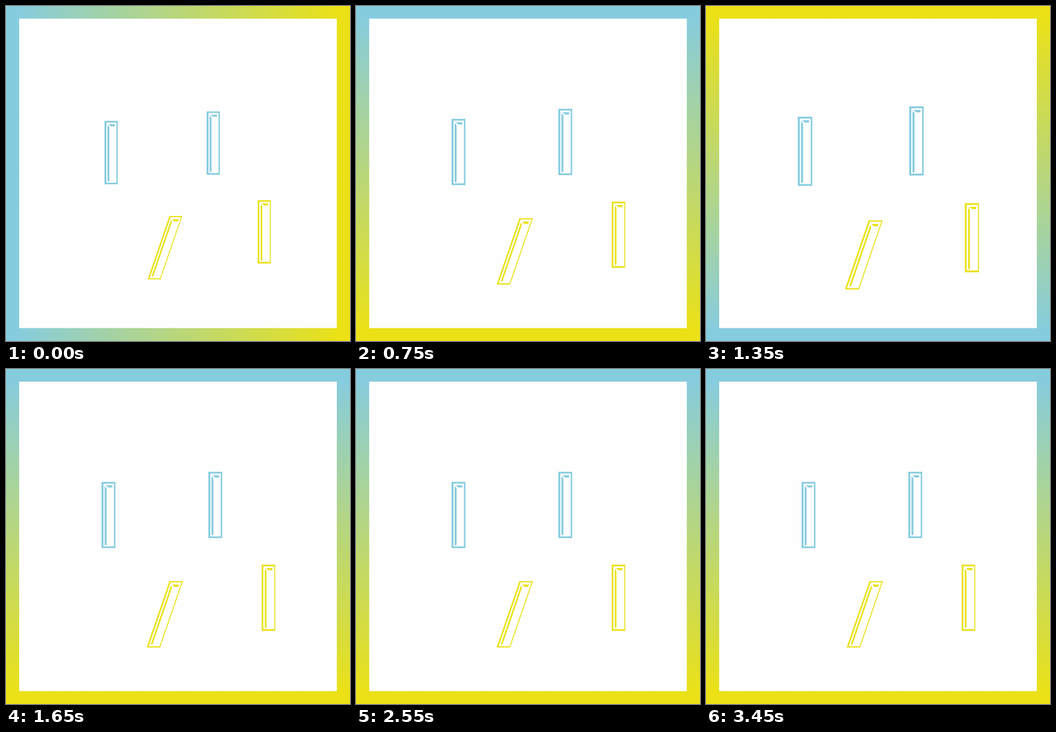
Write an HTML page that moves like this. It is 600 by 584 pixels and loops after 3600 ms.

```html
<!DOCTYPE html>
<html lang="en">
<head>
<meta charset="utf-8">
<title>Bars</title>
<style>
  html, body { margin: 0; width: 100%; height: 100%; overflow: hidden; }
  #stage { display: block; width: 600px; height: 584px; }
</style>
</head>
<body>
<svg id="stage" viewBox="0 0 600 584">
  <rect x="23" y="22" width="554" height="539.5" fill="#fefefe"/>
  <g id="bars"></g>
</svg>
<script>
const BLUE = '#86ccdf', YELLOW = '#ebe116';
const H = 110.5, STEP = 150, CX = 300.6, CY = 280;

const stage = document.getElementById('stage');
const group = document.getElementById('bars');

// Frame, left strip and top highlight of one bar, sheared by lean.
function barPath(w, lean, left, right) {
  const cap = lean ? 2 : 2.9;
  const poly = (...pts) => 'M' + pts.map(([x, y]) => [x + lean * (1 - y / H), y]).join('L') + 'Z';
  const box = (x0, y0, x1, y1) => poly([x0, y0], [x1, y0], [x1, y1], [x0, y1]);
  const a = 5.2, b = a + left;
  return box(0, 0, w, H) + box(left, cap, w - right, H - cap) +
    poly([a, 7], [b, 10.5], [b, H - 5], [a, H - 5]) +
    poly([6.8, 5.7], [18, 5.7], [18, 9.4], [11.2, 9.4]);
}

function addBar(color, x, y, lean = 0) {
  const blue = color === BLUE;
  const d = blue ? barPath(23.1, lean, 3.2, 2.4) : barPath(22.6, lean, 2.8, 1.6);
  const node = document.createElementNS('http://www.w3.org/2000/svg', 'path');
  const attrs = { d, fill: color, 'fill-rule': 'evenodd', transform: `translate(${x} ${y})` };
  for (const name in attrs) node.setAttribute(name, attrs[name]);
  group.append(node);
}

addBar(BLUE, 171.8, 200.3);
addBar(BLUE, 350, 183.7);
addBar(YELLOW, 439, 338.4);
addBar(YELLOW, 247, 366, 38);

// Poses swing 0 1 2 3 2 1: each is a quarter turn of the gradient and a sine step in size.
function draw(now) {
  const pose = 3 - Math.abs(3 - Math.floor(now / STEP) % 6);
  const phase = pose * Math.PI / 6;
  const scale = 1 + 0.0905 * Math.sin(phase);
  const sway = 0.8 * Math.sin(2 * phase);
  stage.style.background = `linear-gradient(${90 + 90 * pose}deg, ${BLUE} 3%, ${YELLOW} 97%)`;
  group.setAttribute('transform',
    `translate(${CX + sway} ${CY}) scale(${scale}) translate(${-CX} ${-CY})`);
}

const start = performance.now();
function tick() {
  draw(performance.now() - start);
  requestAnimationFrame(tick);
}
tick();
</script>
</body>
</html>
```
